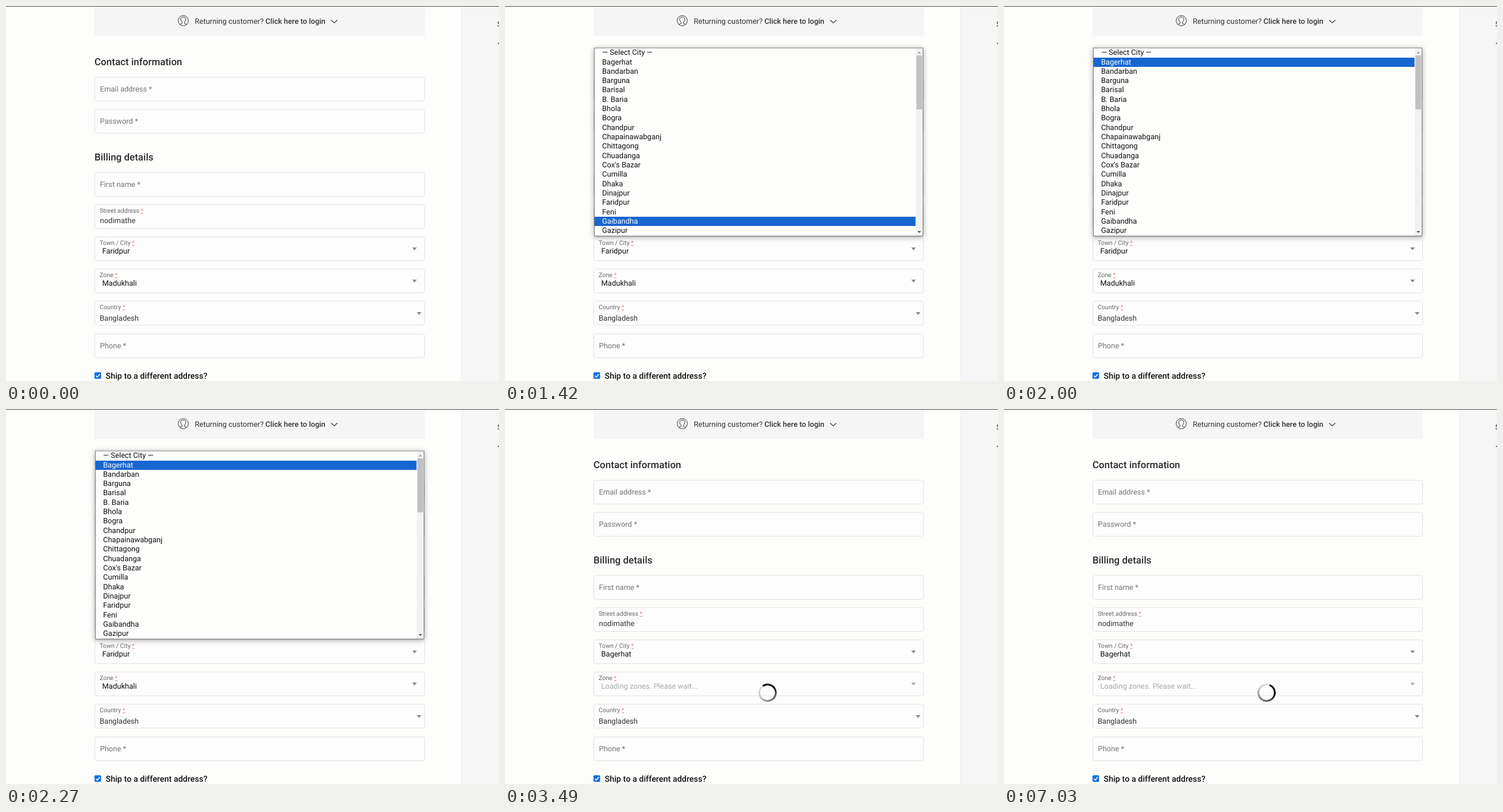
These frames come from a looping animation (858x653 px, 8 s). An HTML page:

```html
<!DOCTYPE html>
<html lang="en">
<head>
<meta charset="utf-8">
<title>Checkout form</title>
<style>
html, body { margin: 0; width: 858px; height: 653px; overflow: hidden; background: #fdfdfc; }
svg { position: absolute; left: 0; top: 0; }
text { font: 13px Roboto, sans-serif; fill: #333; white-space: pre; text-rendering: geometricPrecision; }
.head { font-size: 17px; font-weight: 500; fill: #2b2b2b; }
.hint { fill: #757575; }
.label { font-size: 10.7px; fill: #666; }
.star { fill: #e88478; text-decoration: underline dotted; }
.value { fill: #111; }
.field { fill: #fdfdfd; stroke: #e2e2e5; }
.arrow { fill: #888; }
.loading .value, .loading .arrow { fill: #aaa; }
#popup { filter: drop-shadow(0 2px 5px rgba(0, 0, 0, .32)); }
#spinner {
  position: absolute; left: 441px; top: 478px; width: 32px; height: 32px; border-radius: 50%;
  background: conic-gradient(from 22deg, #000 0 75deg, #505050 130deg, #8a8a8a 220deg, #c8c8c8 280deg, #e4e4e4 360deg);
  mask: radial-gradient(circle, transparent 12.4px, #000 13px);
}
</style>
</head>
<body>
<svg id="stage" width="858" height="653"></svg>
<div id="spinner"></div>
<script>
const LOOP = 8000, OPEN = 1000, LISTED = 1040, CLOSED = 3040, CHOSEN = 3100;
const ROW = 16.32, LIST_TOP = 73.4;
const cities = ['— Select City —', 'Bagerhat', 'Bandarban', 'Barguna', 'Barisal', 'B. Baria', 'Bhola',
  'Bogra', 'Chandpur', 'Chapainawabganj', 'Chittagong', 'Chuadanga', "Cox's Bazar", 'Cumilla',
  'Dhaka', 'Dinajpur', 'Faridpur', 'Feni', 'Gaibandha', 'Gazipur'];
// [time, highlighted row]
const hover = [[0, 16], [1420, 18], [1450, 16], [1490, 14], [1530, 13], [1740, 12], [1790, 10],
  [1840, 7], [1890, 4], [1940, 2], [2000, 1]];
// spans in which the spinner turns; it stalls in between
const turning = [[3100, 3490], [4130, 4270], [4620, 4650]];

const rect = (x, y, w, h, fill) => `<rect x="${x}" y="${y}" width="${w}" height="${h}" fill="${fill}"/>`;
const text = (x, y, s, cls = '', extra = '') => `<text x="${x}" y="${y}" class="${cls}" ${extra}>${s}</text>`;
const arrow = (x, y) => `<path class="arrow" d="M${x - 4} ${y - 2.5}h8l-4 5z"/>`;
const box = y => `<rect class="field" x="154.5" y="${y}" width="574" height="41.5" rx="3.5"/>`;
const hintField = (y, s) => box(y) + text(163.5, y + 24.6, s + ' *', 'hint');
const label = (y, s) => text(163, y + 13.5, `${s} <tspan class="star">*</tspan>`, 'label');
const select = (y, name, value, id) => `<g id="${id}">${box(y)}${label(y, name)}` +
  text(167.5, y + 29, value, 'value') + arrow(711, y + 21) + '</g>';

const page =
  rect(792, 0, 66, 653, '#f6f6f6') + rect(792, 0, 1, 653, '#efeff5') +
  rect(154, 0, 575, 52, '#f5f5f5') + rect(0, 0, 858, 1, '#4a4a4a') +
  `<g fill="none" stroke="#333"><circle cx="308.5" cy="25.5" r="8.9"/>
   <path d="M306.5 28.2c-4-4-3-9 2-9s6 5 2 9v2l4 2M306.5 28.2v2l-4 2"/>
   <path d="M566 24.5l5.3 5 5.3-5" stroke-width="1.2"/></g>` +
  text(328.5, 30.5, 'Returning customer? <tspan font-weight="500">Click here to login</tspan>') +
  text(855, 36, 'S', '', 'font-weight="700"') + rect(856, 64.5, 2, 1.5, '#333') +
  text(154, 103.3, 'Contact information', 'head') +
  hintField(124, 'Email address') + hintField(180, 'Password') +
  text(154, 269.3, 'Billing details', 'head') +
  hintField(290, 'First name') +
  box(346) + label(346, 'Street address') + text(163.5, 377.5, 'nodimathe') +
  select(402, 'Town / City', '', 'city') + select(458, 'Zone', '', 'zone') +
  box(514) + label(514, 'Country') + text(163, 547.6, 'Bangladesh') + arrow(719, 535.5) +
  hintField(571, 'Phone') +
  '<rect x="154" y="637.8" width="11.5" height="11.5" rx="2" fill="#0b70e5"/>' +
  '<path d="M156.5 643.8l2.4 2.5 4.3-5.4" fill="none" stroke="#fff" stroke-width="1.6"/>' +
  text(173.5, 648.7, 'Ship to a different address?', 'value', 'style="font-size:14.4px;font-weight:500"');

const popup = `<g id="popup">${rect(155, 72, 573, 329, '#252525')}<g id="list">` +
  rect(155, 72, 573, 329, '#fdfdfc') +
  '<rect x="155.5" y="73" width="572" height="327.5" fill="#fdfdfc" stroke="#767676"/>' +
  rect(715, 74, 12, 326, '#f1f1f1') + rect(716, 86, 10, 94, '#c1c1c1') +
  '<path d="M718 82.5h6l-3-3z" fill="#999"/><path d="M718 392h6l-3 3z" fill="#444"/>' +
  `<rect id="mark" x="156" width="558.5" height="16" fill="#1766cf"/>` +
  cities.map((c, i) => text(169, 85.2 + i * ROW, c, 'value city')).join('') + '</g></g>';

const $ = id => document.getElementById(id);
$('stage').innerHTML = page + popup;
const rows = [...document.querySelectorAll('.city')];
const cityValue = $('city').querySelector('.value'), zoneValue = $('zone').querySelector('.value');
const show = (id, on) => $(id).style.display = on ? '' : 'none';

function spinnerAngle(t) {
  const [, end] = turning.findLast(([start]) => t >= start) || turning[0];
  return (Math.min(t, end) - 4650) * .36;
}

function draw(now) {
  const t = now % LOOP, chosen = t >= CHOSEN;
  const row = hover.findLast(([time]) => t >= time)[1];
  show('popup', t >= OPEN && t < CLOSED);
  show('list', t >= LISTED);
  $('mark').setAttribute('y', Math.round(LIST_TOP + row * ROW));
  rows.forEach((r, i) => r.style.fill = i === row ? '#fff' : '');
  cityValue.textContent = chosen ? 'Bagerhat' : 'Faridpur';
  zoneValue.textContent = chosen ? 'Loading zones. Please wait...' : 'Madukhali';
  $('zone').classList.toggle('loading', chosen);
  show('spinner', chosen);
  $('spinner').style.transform = `rotate(${spinnerAngle(t)}deg)`;
}

const began = performance.now();
function tick() {
  draw(performance.now() - began);
  requestAnimationFrame(tick);
}
tick();
</script>
</body>
</html>
```
